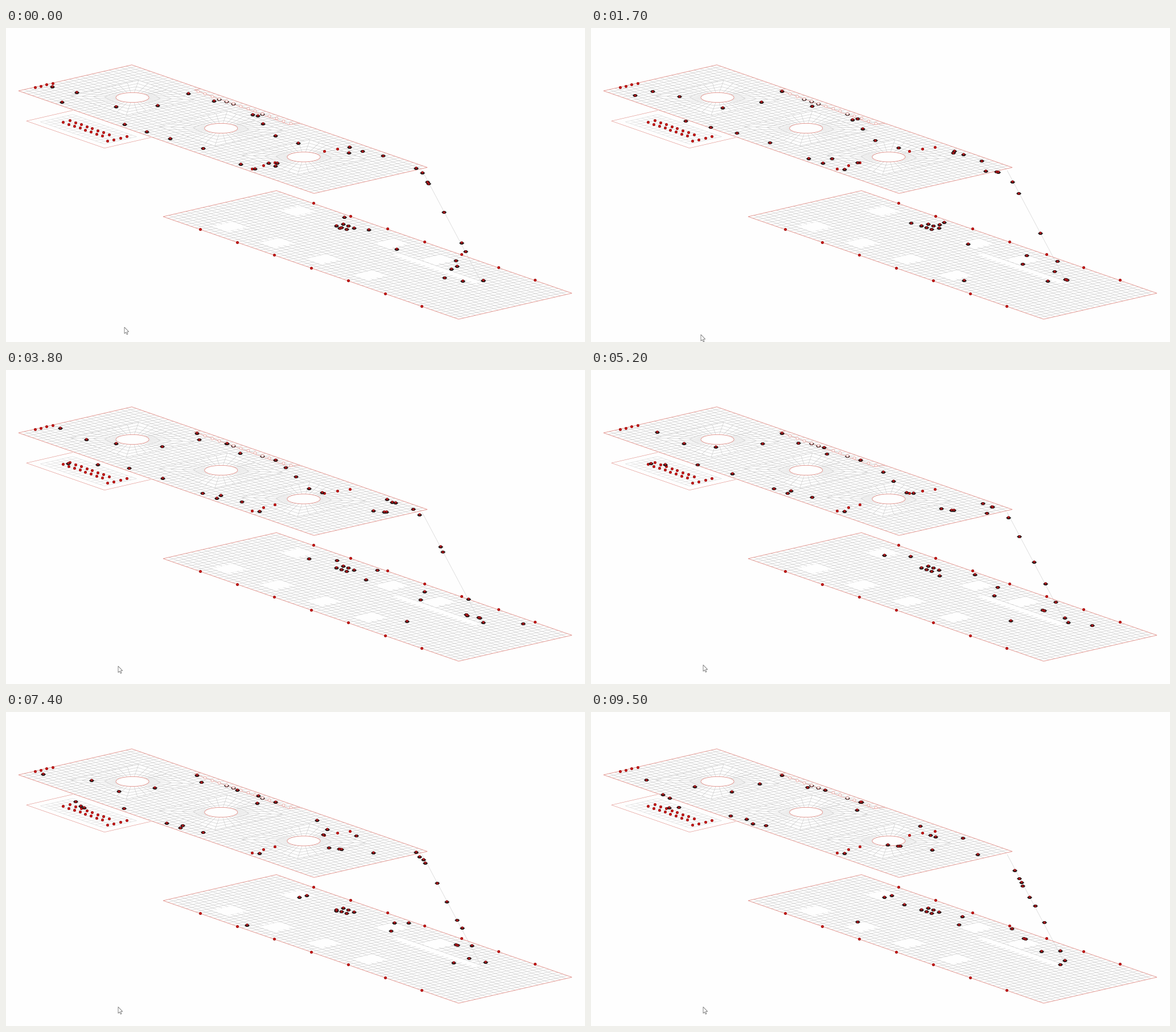
Animation of 1017 by 551 pixels, one loop 9.6 s. Source, as a matplotlib script:

```python
import numpy as np
import matplotlib.pyplot as plt
from matplotlib.animation import FuncAnimation
from matplotlib.collections import LineCollection
from matplotlib.patches import Polygon

W, H, DPI = 1017, 551, 100
FRAMES, STEP = 96, 100
PX = 72 / DPI
PAPER, GREY, EDGE, RED, DARK = "#fefefe", "#c6c6c6", "#e18d86", "#c4100e", "#1c1414"

U, V = np.array([199, -45.6]), np.array([519, 180])
NA, NB = 20, 64                      # cells across and along a floor
TOP, LOW = np.array([22, 110.3]), np.array([276, 331])
TILT = .2816                         # foreshortening of the ground plane
WALK, HURRY, STAIRS = 23.5, 27.5, 21.9   # speeds in pixels per second

fig = plt.figure(figsize=((W + .01) / DPI, (H + .01) / DPI), dpi=DPI, facecolor=PAPER)
ax = fig.add_axes([0, 0, 1, 1])
ax.set(xlim=(0, W), ylim=(H, 0))
ax.axis("off")


def place(org, a, b):
    """Cell coordinates on a floor to stage pixels."""
    a, b = np.broadcast_arrays(np.asarray(a, float), b)
    return org + np.multiply.outer(a / NA, U) + np.multiply.outer(b / NB, V)


def lines(segs, color=GREY, z=1):
    ax.add_collection(LineCollection(segs, colors=color, linewidths=.6 * PX, zorder=z))


def quad(pts, fill="none", edge="none", z=2):
    ax.add_patch(Polygon(pts, closed=True, fc=fill, ec=edge, lw=.85 * PX, zorder=z))


def box(org, a0, a1, b0, b1):
    return place(org, [a0, a1, a1, a0], [b0, b0, b1, b1])


def floor(org):
    segs = [place(org, [a, a], [0, NB]) for a in range(1, NA)]
    segs += [place(org, [0, NA], [b, b]) for b in range(1, NB)]
    lines(segs)
    quad(box(org, 0, NA, 0, NB), edge=EDGE, z=4)


def atrium(b0, half=6, r=2.27):
    """Round opening with a mesh fanning out to the square grid."""
    quad(box(TOP, 10 - half, 10 + half, b0 - half, b0 + half), fill=PAPER)
    ang = np.linspace(0, 2 * np.pi, 33)
    c, s = np.cos(ang), np.sin(ang)
    reach = half / np.maximum(abs(c), abs(s))

    def ring(k):
        d = r + (reach - r) * k
        return place(TOP, 10 + d * c, b0 + d * s)

    lines(np.stack([ring(0), ring(1)], axis=1), z=3)
    lines([ring(k) for k in (.25, .5, .75, 1)], z=3)
    th = np.linspace(0, 2 * np.pi, 80)
    cx, cy = place(TOP, 10, b0)
    quad(np.c_[cx + 29 * np.cos(th), cy - .4 + 8.6 * np.sin(th)], PAPER, EDGE, 4)


def side(a, b):
    """Point on the side platform, which starts under the upper floor."""
    return 36 + 81 * a + 137 * b, 163.2 - 18.6 * a + 47.6 * b


def row(x, y, dx, dy, n):
    return [(x + i * dx, y + i * dy) for i in range(n)]


lines([[side(a, .09), side(a, .91)] for a in np.linspace(.15, .85, 7)], "#dadada")
lines([[side(.15, b), side(.85, b)] for b in np.linspace(.09, .91, 15)], "#dadada")
lines([[side(1, 0), side(0, 0), side(0, 1), side(1, 1)]], EDGE, 4)

floor(TOP)
for b0 in (12.4, 31.6, 49.5):
    atrium(b0)

floor(LOW)
for a in (4, 16):
    for k in range(4):
        if (a, k) != (16, 1):
            b = 9.5 + 10.1 * k
            quad(box(LOW, a - 1.8, a + 1.8, b - 1.6, b + 1.6), PAPER)
quad(box(LOW, 12.8, 13.9, 34, 52), PAPER)
lines([[(731, 250), (835, 446)]], "#cfcfcf", 3)

# Balcony with its row of seats
seats = np.array(row(336.5, 111, 12.58, 4.3, 14))
ax.plot([341, 331, 497, 516], [106.5, 108.5, 169.5, 167.5], color=EDGE, lw=.7 * PX, zorder=4)
ax.plot(*seats.T, "o", ms=4.8 * PX, mfc="#fff6f5", mec="#e5a09a", mew=.7 * PX, zorder=7)

balls = (row(51, 104.3, 10.2, -2.4, 4) + row(100, 165.2, 9.85, 3.4, 8)
         + row(112, 162.5, 9.85, 3.45, 8) + row(177.5, 198.2, 11.6, -2.6, 4)
         + row(559.3, 216, 22.5, -3.5, 3) + row(432.3, 246.6, 20, -5.1, 3)
         + row(540, 307.2, 64.9, 22.5, 7) + row(341, 353.4, 64.9, 22.5, 7))
ax.plot(*np.array(balls).T, "o", ms=4.6 * PX, mfc=RED, mec="#8c0f0e", mew=.5 * PX, zorder=6)


def route(*pts, pace=WALK, zero=0):
    """Times and places along a path; a third value of a point is a wait there."""
    times, spots, t = [0.0], [pts[0][:2]], 0.0
    for p, q in zip(pts, pts[1:]):
        if len(p) > 2:
            t += p[2]
            times.append(t)
            spots.append(p[:2])
        dx, dy = q[0] - p[0], q[1] - p[1]
        if abs(dy) > 1.2 * abs(dx) and abs(dy) > 50:
            t += np.hypot(dx, dy) / STAIRS
        else:
            t += np.hypot(dx, dy / TILT) / pace
        times.append(t)
        spots.append(q[:2])
    return np.array(times) - times[spots.index(pts[zero][:2])], np.array(spots)


def straight(x, y, secs=12, dx=15.3, dy=5.1):
    return np.array([0, secs]), np.array([(x, y), (x + dx * secs, y + dy * secs)])


# Shared routes: each is walked by several people, who pass its zero point at the given times
up = route((617, 444), (778, 438), (811, 446), (834, 441), (731, 254), (646, 247), (521, 233), zero=4)
down = route((471, 188), (555, 215, 2), (603, 219), (635, 215), (664, 225), (728, 249),
             (838, 443, 2), (814, 433), (788, 418), (798, 411), (553, 324), (528, 322), zero=5)
hall = route((782, 423), (515, 325))
east = route((81, 103), (196, 139), (246, 140), (337, 122), (396, 136), (411, 137))
west = route((476, 237, 1.4), (420, 233), (195, 166), (137, 168), pace=HURRY)

walks = [(r, start) for r, starts in (
    (up, (0, .85, 1, 3.6, 7.2, 11.5, 13.2, 19.8)),
    (down, (.6, 4.7, 6.9, 8, 14.8, 17.4, -6.7, -10.6, -10.8, -18.2, -28.7)),
    (hall, (0, -6.7, -13.7)),
    (east, (0, -7.1, -10.5)),
    (west, (0, -7.4, -10.5))) for start in starts]

# People crossing a floor on their own
walks += [(straight(x, y), start) for x, y, start in (
    (433, 152, 0), (451, 168, 0), (594, 332, 0), (374, 124, 2.9), (81, 97, 2.9), (51, 104, 6.5))]
walks += [(r, 0) for r in (
    route((365, 128), (411, 146, 1.6), (478, 177)),
    route((124, 113), (234, 138), (296, 126)),
    route((603, 209), (711, 242), (728, 250), (835, 446), pace=29),
    route((792, 418), (832, 435, 3), (731, 250)),
    route((442, 154), (462, 161), (473, 158)),
    route((320, 115), (335, 111)),
    route((473, 242), (445, 248)),
    route((461, 237), (381, 221), (273, 188), pace=HURRY),
    route((437, 247), (284, 196), pace=HURRY),
    route((412, 239), (244, 182), pace=HURRY),
    route((247, 182), (171, 166), (130, 166, 2.3), (138, 151), pace=HURRY),
    route((208, 169), (166, 163), (105, 164, 2.4), (121, 159), (126, 145), pace=HURRY))]
walks += [(route((929, 442), (882, 449), (832, 436)), 2.8), (route((406, 376), (468, 368)), 6.6)]
leaver = route((98, 130), (53, 105), pace=HURRY)

queue = row(592, 344, 9.4, 3.3, 3) + row(579.5, 347, 9.4, 3.2, 3)
cursor = np.array([0, 1.5, 2.2, 3.7, 4.4]), np.array([(208, 525), (193, 538), (193, 538), (197, 520), (197, 517.5)])


def at(path, t, left=None, right=None):
    times, spots = path
    return [np.interp(t, times, c, left=left, right=right) for c in spots.T]


HEX = [(-1, 0), (-.4, -.56), (.4, -.56), (1, 0), (.4, .56), (-.4, .56), (-1, 0)]


def people(z):
    body, = ax.plot([], [], ls="", marker=HEX, ms=8.6 * PX, mfc=DARK, mec=DARK, mew=.2 * PX, zorder=z)
    head, = ax.plot([], [], "o", ms=3.6 * PX, mfc="#b5161a", mec="#7a1214", mew=.5 * PX, zorder=z + .1)
    return body, head


movers, sitters = people(8), people(6.5)
ARROW = np.array([(0, 0), (0, 11.2), (2.5, 8.9), (4.3, 12.8), (6, 12), (4.3, 8.2), (7.7, 8)])
arrow = Polygon(ARROW, closed=True, fc="white", ec="#6a6a6a", lw=.8 * PX, zorder=12)
ax.add_patch(arrow)


def show(pair, pts):
    x, y = np.array(pts).T
    pair[0].set_data(x, y)
    pair[1].set_data(x, y - .5)


def draw(i):
    t = i * STEP / 1000
    spots = [at(path, t - start, left=np.nan) for path, start in walks]
    show(movers, spots + [at(leaver, t, right=np.nan)] + queue)
    taken = [4, 5, 9] + ([3] if t < 2.9 else [])
    show(sitters, seats[taken] + (0, 1))
    arrow.set_xy(ARROW + at(cursor, t))
    return (*movers, *sitters, arrow)


anim = FuncAnimation(fig, draw, frames=FRAMES, interval=STEP, repeat=True, repeat_delay=0, blit=False)
plt.show()
```
